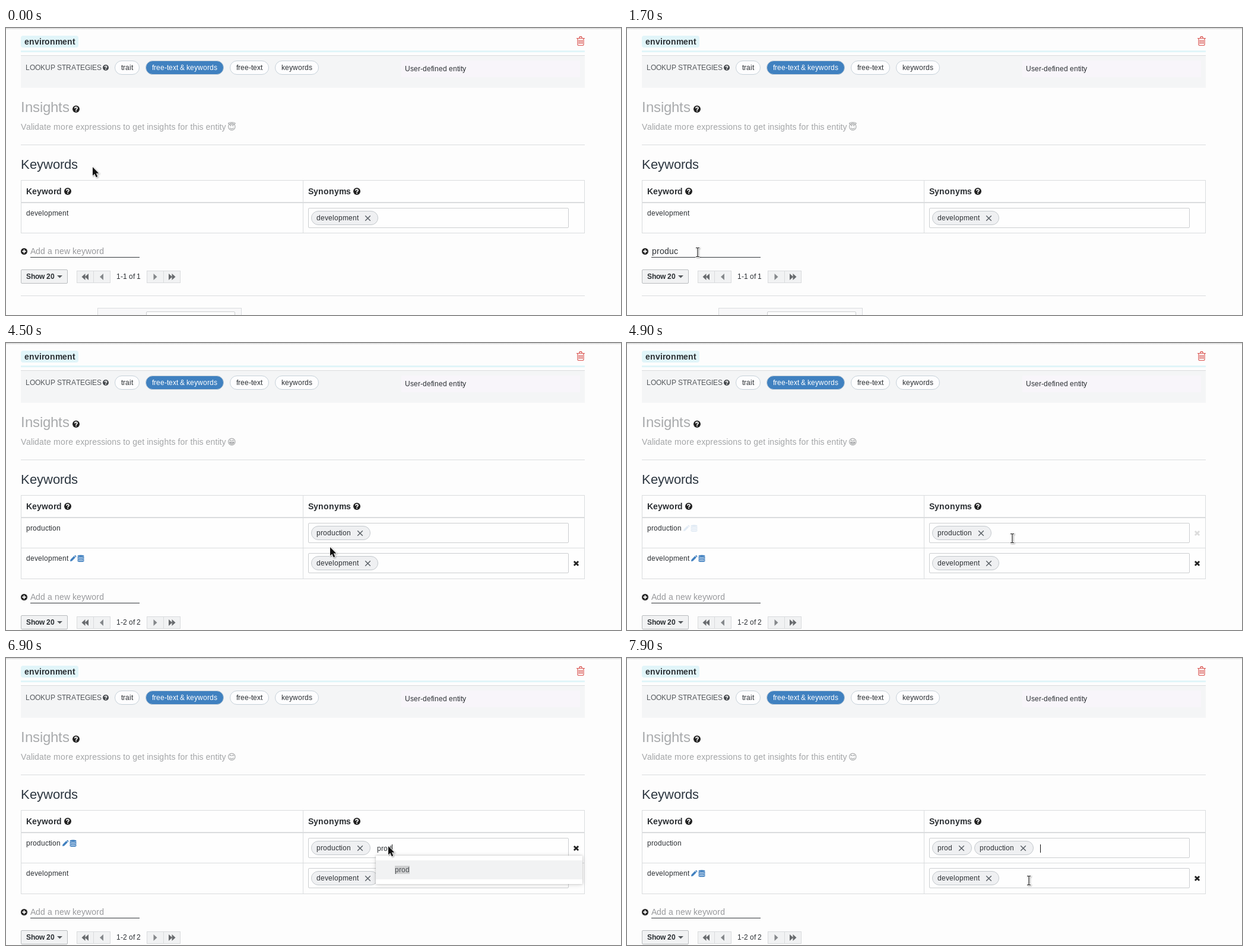
Animation of 1036x485 px, one loop 8000 ms. Source, as an HTML page:

```html
<!DOCTYPE html>
<html lang="en">
<head>
<meta charset="utf-8">
<title>Entity keywords</title>
<style>
html, body { margin: 0; width: 100%; height: 100%; overflow: hidden; background: #fdfdfd; }
#stage { position: absolute; left: 0; top: 0; width: 1036px; height: 485px; overflow: hidden;
  font-family: "Liberation Sans", Arial, sans-serif; font-kerning: none; color: #2b2f33; }
#stage div, #stage svg { position: absolute; box-sizing: border-box; }
#stage svg { left: 0; top: 0; overflow: visible; }
.t { white-space: pre; }
.pill { background: #fdfdfe; border: 1px solid #c6d1d9; border-radius: 12px; }
.pill.on { background: #4081c0; }
.btn { background: #f1f2f3; border: 1px solid #d9dbdd; }
.field { background: #fefefe; border: 1px solid #ccced0; border-radius: 2px; }
.tags { display: flex; height: 24px; font-size: 12px; line-height: 14px; white-space: pre; }
.chip { display: flex; align-items: center; margin-right: 4px; padding: 0 11px 0 8px;
  border: 1px solid #c3c8cc; border-radius: 12px; background: #eff0f2; }
#stage .chip svg { position: static; margin-left: 10px; }
.query { margin: 6px 0 0 7px; height: 14px; display: flex; }
.caret { width: 1px; background: #111; }
</style>
</head>
<body>
<div id="stage"></div>
<script>
const LOOP = 8000, STEP = 100, SHIFT = 52;
const INK = '#2b2f33', GREY = '#a3a5a7', BLUE = '#3f7fbf', RULE = '#dadcde';

const pen = document.createElement('canvas').getContext('2d');

// lays out each glyph on whole pixels, as hinted text does
const snap = (str, size, weight = 'normal') => {
  pen.font = `${weight} 100px "Liberation Sans", Arial, sans-serif`;
  return '<span>' + [...str].map(c => {
    const w = pen.measureText(c).width * size / 100;
    return `<span style="letter-spacing:${(Math.round(w) - w).toFixed(3)}px">${c}</span>`;
  }).join('') + '</span>';
};

const box = (x, y, w, h, css = '', cls = '', inner = '', id = '') =>
  `<div id="${id}" class="${cls}" style="left:${x}px;top:${y}px;width:${w}px;height:${h}px;${css}">${inner}</div>`;
const fill = (x, y, w, h, color) => box(x, y, w, h, `background:${color}`);

// y is the baseline
function text(x, y, size, str, color = INK, css = '', id = '', weight = 'normal') {
  const up = Math.round(size * .905), down = Math.round(size * .212);
  return `<div id="${id}" class="t" style="left:${x}px;top:${y - up}px;font-size:${size}px;font-weight:${weight};` +
    `line-height:${up + down}px;color:${color};${css}">${snap(str, size, weight)}</div>`;
}
const bold = (x, y, size, str) => text(x, y, size, str, INK, '', '', 'bold');

// icons are drawn around their own zero point
const icon = (x, y, inner, id = '') =>
  `<svg id="${id}" width="1" height="1"><g transform="translate(${x} ${y})">${inner}</g></svg>`;
const path = (d, color, width) => width
  ? `<path d="${d}" fill="none" stroke="${color}" stroke-width="${width}"/>`
  : `<path d="${d}" fill="${color}"/>`;

const help = (x, y, r, color = '#222') => icon(x, y, `<g transform="scale(${r / 6})"><circle r="6" fill="${color}"/>` +
  path('M-2-1.2C-2-4 2-4 2-1.4C2 0 0 0 0 1.5', '#fff', 1.8) + path('M-.9 2.4h1.8v1.7h-1.8z', '#fff') + '</g>');
const pencil = x => icon(x, 17, path('M-5 5l.6-3 5.9-5.9 2.4 2.4-5.9 5.9zM2.2-4.6l.9-.6q.6-.3 1.2.3l.8.8q.6.6.2 1.2l-.7.8z', BLUE));
const stack = x => icon(x, 17, `<ellipse cy="-3.9" rx="5.5" ry="1.9" fill="${BLUE}"/>` +
  [-2.3, .5, 3.2].map(y => path(`M-5 ${y}c0 2.6 10 2.6 10 0`, BLUE, 1.8)).join(''));
const remove = icon(960.5, 25.5, path('M-3.6-3.6l7.2 7.2M3.6-3.6l-7.2 7.2', '#222', 2.8));
const trash = icon(968, 22, path('M-7-4.5h14M-2.5-4.5l1-2.8h3l1 2.8M-5-4.5v10.5q0 1.5 1.5 1.5h7q1.5 0 1.5-1.5v-10.5' +
  'M-2.5-2v7M0-2v7M2.5-2v7', '#d9534f', 1.2));
const arrows = (x, dir, n) => icon(x, 420.5, (n === 2 ? [-5.5, 0] : [-3]).map(a =>
  path(`M${a * dir}-5.5l${6 * dir} 5.5l${-6 * dir} 5.5z`, n === 2 ? '#686b6e' : '#85888b')).join(''));

const pill = (x, w, str, on) => box(x, 55, w, 24, '', on ? 'pill on' : 'pill') +
  text(x + 11, 71, 12, str, on ? '#fff' : INK);
const chip = str => `<span class="chip">${snap(str, 12)}<svg width="11" height="11">` +
  path('M1.2 1.2l8.6 8.6M9.8 1.2l-8.6 8.6', '#5b6167', 1.5) + '</svg></span>';

const row = (id, word, iconX) => box(0, 296, 1036, 51, '', '',
  text(34, 21, 12, word) +
  box(509, 8, 439, 34, '', 'field') +
  box(514, 13, 430, 24, '', 'tags', chip(word), id + 'Tags') +
  box(0, 0, 1036, 51, '', '', pencil(iconX + 5) + stack(iconX + 18) + remove, id + 'Tools'), id);

const $ = id => document.getElementById(id);

$('stage').innerHTML =
  box(0, 0, 1036, 3, 'background:linear-gradient(#d4d4d4,#fdfdfd)') +
  box(25, 13, 97, 20, 'background:#e1f5f9;border-radius:4px') + bold(31, 28, 14, 'environment') + trash +
  fill(25, 38, 950, 3, '#e0f5f9') +
  box(25, 46, 950, 55, `background:#f4f5f6;border-top:1px solid ${RULE}`) +
  text(33, 71, 12, 'LOOKUP STRATEGIES', '#55595d') + help(168, 67, 5, '#44484c') +
  pill(183, 42, 'trait') + pill(235, 132, 'free-text & keywords', true) +
  pill(377, 66, 'free-text') + pill(453, 74, 'keywords') +
  fill(666, 55, 301, 28, '#f8f5fa') + text(672, 73, 12, 'User-defined entity') +
  text(25, 142, 24, 'Insights', '#a9abad') + help(118, 137, 6) +
  text(25, 172, 14, 'Validate more expressions to get insights for this entity', GREY) +
  text(373, 172, 14, '', '#949698', 'font-family:"DejaVu Sans",sans-serif', 'mood') +
  fill(25, 197, 950, 1, RULE) +
  text(25, 238, 22, 'Keywords', '#2c3640') +
  box(25, 257, 950, 90, `border:1px solid ${RULE};background:#fefefe`, '', '', 'table') +
  box(500, 257, 1, 90, `background:${RULE}`, '', '', 'divider') +
  fill(25, 294, 950, 2, RULE) +
  bold(34, 281, 14, 'Keyword') + help(104, 276, 6) +
  bold(509, 281, 14, 'Synonyms') + help(591, 276, 6) +
  box(25, 346, 950, 1, `background:${RULE}`, '', '', 'rowLine') +
  row('prod', 'production', 95) + row('dev', 'development', 108) +
  box(0, 0, 1036, 485, '', '',
    icon(30.5, 377.5, '<circle r="5.5" fill="#222"/>' + path('M-3.2 0h6.4M0-3.2v6.4', '#fff', 1.8)) +
    text(41, 382, 14, 'Add a new keyword', GREY, '', 'hint') +
    text(42, 382, 14, '', INK, 'display:flex', 'typed') +
    fill(41, 387, 184, 1, '#33373b') +
    box(25, 408, 79, 24, 'border-color:#b9bcbf;border-radius:2px', 'btn') + bold(34, 424, 12, 'Show 20') +
    icon(90.5, 420, path('M-4.5-2h9l-4.5 4.5z', '#55595d')) +
    [119, 147, 237, 265].map(x => box(x, 410, 29, 21, '', 'btn')).join('') +
    arrows(133.5, -1, 2) + arrows(161, -1, 1) + arrows(251.5, 1, 1) + arrows(279.5, 1, 2) +
    text(186, 424, 12, '', INK, '', 'count') +
    fill(25, 452, 950, 1, RULE) +
    box(154, 473, 243, 60, `background:#f8f8f9;border:1px solid ${RULE}`) +
    box(236, 479, 150, 40, '', 'field'), 'lower') +
  box(623, 334, 348, 48, 'background:#fff;box-shadow:0 0 3px rgba(0,0,0,.2),0 1px 8px rgba(0,0,0,.14)', '',
    fill(0, 8, 348, 32, '#f1f2f3') +
    text(32, 28, 12, '', '#4a4e52', 'background:#cfd0d1', 'option'), 'menu') +
  icon(0, 0, '<g style="filter:drop-shadow(1px 1px 1px rgba(0,0,0,.35))">' +
    '<path d="M-1-2v14.5l3.3-3 2.5 5.7 2.5-1.1-2.5-5.6h4.5z" fill="#111" stroke="#fff" stroke-width="1.6" paint-order="stroke"/></g>', 'arrow') +
  icon(0, 0, '<g style="filter:drop-shadow(1px 1px 1px rgba(0,0,0,.3))">' +
    path('M-3.5-7.5h2.5l1 .5 1-.5h2.5M0-7v14M-3.5 7.5h2.5l1-.5 1 .5h2.5', '#fff', 3) +
    path('M-3-7.5h2l1 .5 1-.5h2M0-7v14M-3 7.5h2l1-.5 1 .5h2', '#111', 1.1) + '</g>', 'beam');

// time, x, y of the pointer's hot spot
const POINTER = [[0, 147, 237], [100, 144, 250], [200, 135, 292], [300, 125, 345], [400, 119, 379], [3700, 119, 379],
  [3800, 231, 264], [4000, 231, 264], [4400, 500, 335], [4700, 640, 370], [4900, 649, 330], [5300, 694, 335],
  [5500, 694, 335], [5800, 645, 320], [7200, 645, 320], [7500, 652, 328], [7900, 677, 376]];
const SHAPE = [[0, 'arrow'], [400, 'beam'], [3700, 'arrow'], [4600, 'beam'], [6600, 'arrow'], [7400, 'beam']];
const TYPED = [[0, 0], [1200, 2], [1400, 3], [1500, 4], [1600, 5], [1700, 6], [1900, 7], [2000, 8], [2100, 9], [2300, 10], [3200, 0]];
const QUERY = [[0, 0], [6400, 1], [6500, 2], [6600, 3], [6700, 4], [7100, 0]];
const MOOD = [[0, '😇'], [4100, '😁'], [5100, '😊']];
const DEV_TOOLS = [[0, 0], [100, 0], [300, .7], [400, 0], [4300, 0], [4500, 1], [4900, 1], [5000, .5], [5200, 0], [7600, 0], [7900, 1]];
const PROD_TOOLS = [[0, 0], [4800, 0], [4900, .15], [5200, 1], [7600, 1], [7900, 0]];
const MENU = [[0, 0], [6400, 0], [6700, 1], [7000, 1], [7200, 0]];

const step = (keys, t) => keys.filter(k => k[0] <= t).pop()[1];
function tween(keys, t, i = 1) {
  const n = keys.findIndex(k => k[0] > t);
  if (n < 0) return keys[keys.length - 1][i];
  const a = keys[n - 1], b = keys[n];
  return a[i] + (b[i] - a[i]) * (t - a[0]) / (b[0] - a[0]);
}
const within = (t, a, b) => t >= a && t < b;
const show = (id, on) => $(id).style.display = on ? '' : 'none';
const withCaret = (str, size, on) => snap(str, size) + (on ? '<span class="caret"></span>' : '');

function draw(t) {
  const two = t >= 4100, shift = two ? SHIFT : 0;
  show('prod', two);
  show('rowLine', two);
  $('table').style.height = $('divider').style.height = 90 + shift + 'px';
  $('dev').style.top = (two ? 347 : 296) + 'px';
  $('lower').style.top = shift + 'px';
  $('count').innerHTML = snap(two ? '1-2 of 2' : '1-1 of 1', 12);
  $('mood').textContent = step(MOOD, t) + '\uFE0E';
  $('devTools').style.opacity = tween(DEV_TOOLS, t);
  $('prodTools').style.opacity = tween(PROD_TOOLS, t);

  const typed = step(TYPED, t);
  show('hint', !typed);
  $('hint').style.color = within(t, 600, 1200) ? '#c4c6c8' : '#98999c';
  $('typed').innerHTML = withCaret('production'.slice(0, typed), 14, within(t, 600, 1100) || within(t, 2100, 2900));

  const query = 'prod'.slice(0, step(QUERY, t));
  const tags = t < 7100 ? ['production'] : t < 7300 ? ['production', 'prod'] : ['prod', 'production'];
  $('prodTags').innerHTML = tags.map(chip).join('') + `<span class="query">${withCaret(query, 12, t >= 5800)}</span>`;
  $('option').innerHTML = snap(query || 'prod', 12);
  $('menu').style.opacity = tween(MENU, t);

  const shape = step(SHAPE, t);
  for (const id of ['arrow', 'beam']) {
    show(id, id === shape);
    $(id).style.transform = `translate(${Math.round(tween(POINTER, t))}px,${Math.round(tween(POINTER, t, 2))}px)`;
  }
}

let last = -1;
const start = performance.now();
function frame() {
  const t = Math.floor((performance.now() - start) % LOOP / STEP) * STEP;
  if (t !== last) draw(last = t);
  requestAnimationFrame(frame);
}
frame();
</script>
</body>
</html>
```
